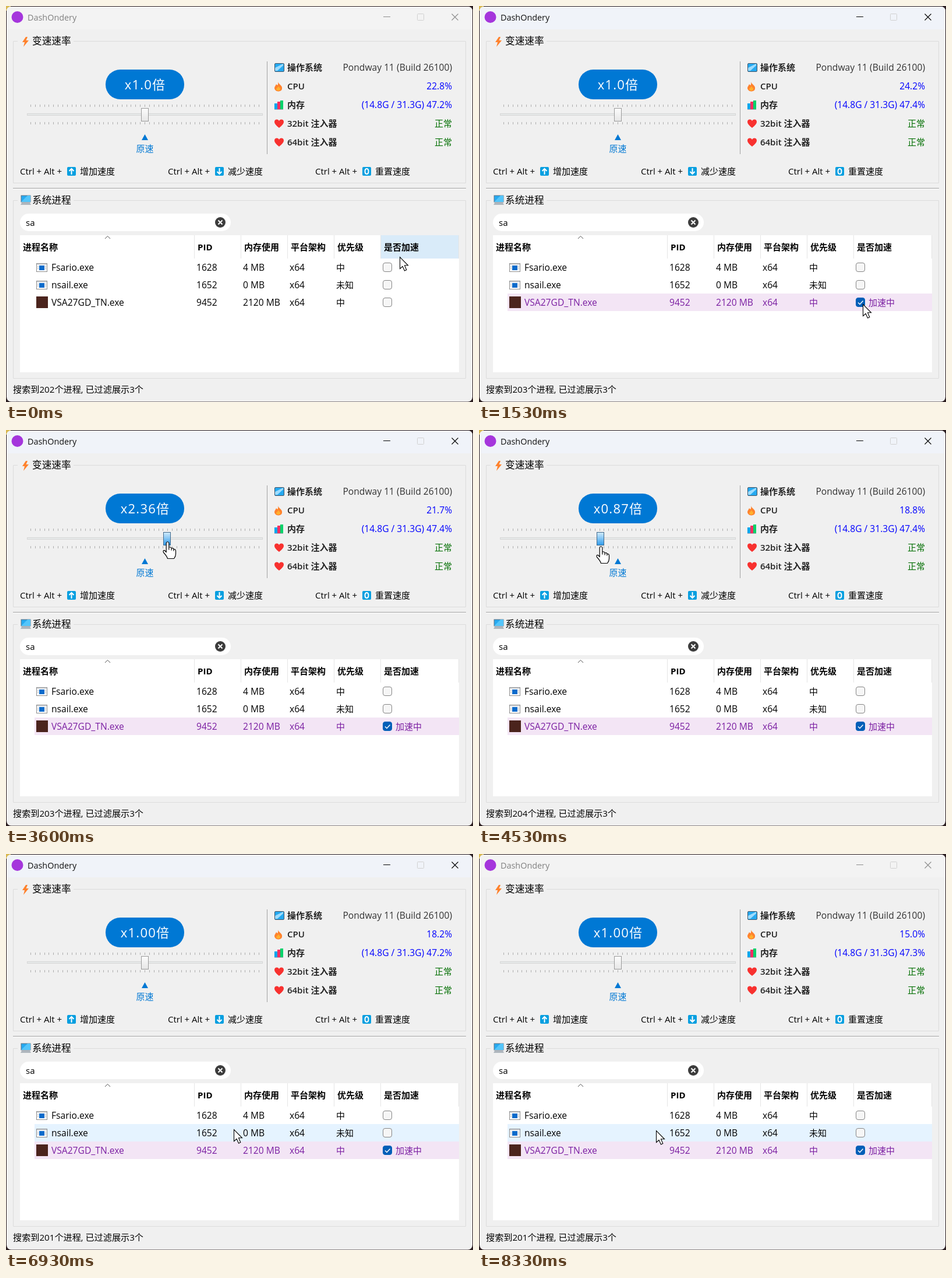
An HTML page that plays this animation: 802x679 px, repeating every 8.4 s.

```html
<!DOCTYPE html>
<html lang="zh-CN">
<head>
<meta charset="utf-8">
<style>
html, body { margin: 0; width: 100%; height: 100%; overflow: hidden; background: #2b1d20; }
svg { display: block; font: 15px "Open Sans", "Noto Sans", "Noto Sans CJK SC", "Noto Sans CJK", sans-serif; }
.latin { font-size: 15.6px; }
.title { font-size: 16.7px; }
.bold { font-weight: 600; }
.head { font-weight: 700; }
.end { text-anchor: end; }
.mid { text-anchor: middle; }
.line { fill: none; stroke: #dcdcdc; }
</style>
</head>
<body>
<svg id="stage" width="802" height="679" viewBox="0 0 802 679"></svg>
<script>
const LOOP = 8400, CHECKED_AT = 1400, BLURRED_AT = 7900;
const DRAG_FROM = 2650, DRAG_TO = 6000, CENTER = 238.5;
const COLUMNS = [24, 323, 403, 483, 563, 643, 778];
const ROWS = [
  ['Fsario.exe', '1628', '4 MB', 'x64', '中'],
  ['nsail.exe', '1652', '0 MB', 'x64', '未知'],
  ['VSA27GD_TN.exe', '9452', '2120 MB', 'x64', '中']
];

// [time, x, y] of the pointer tip
const POINTER = [
  [0, 676, 430], [250, 676, 430], [900, 659, 511], [1600, 659, 511],
  [2400, 239, 183], [2700, 239, 183], [3400, 285, 190], [4400, 209, 199],
  [4600, 209, 199], [5450, 246, 215], [5700, 246, 215], [5900, 239, 218],
  [6100, 240, 220], [6530, 320, 400], [6930, 391, 472], [7300, 391, 473],
  [7730, 304, 474], [8400, 304, 474]
];
const CPU = [[0, '22.8'], [900, '24.2'], [1900, '21.7'], [3900, '18.8'], [5400, '16.4'], [6600, '18.2'], [7600, '15.0']];
const MEMORY = [[0, '47.2'], [900, '47.4'], [5000, '47.2'], [7600, '47.3']];
const COUNT = [[0, 202], [900, 203], [3900, 204], [5400, 201]];

const text = (x, y, s, cls = '', attrs = '') => `<text x="${x}" y="${y}" class="${cls}" ${attrs}>${s}</text>`;
const rect = (x, y, w, h, fill, attrs = '') => `<rect x="${x}" y="${y}" width="${w}" height="${h}" fill="${fill}" ${attrs}/>`;
const path = (d, fill, attrs = '') => `<path d="${d}" fill="${fill}" ${attrs}/>`;
const at = (x, y, s) => `<g transform="translate(${x} ${y})">${s}</g>`;

const heart = path('M8 15C3 11 0 8 0 4.5C0 0 6-1 8 3C10-1 16 0 16 4.5C16 8 13 11 8 15Z', '#f8312f');
const bolt = path('M6 0L0 9H4L2 17L11 6H6.5L9 0Z', '#ff822d');
const flame = path('M6 0C8 5 14 6 13 12C12 18 1 18 0 11C0 8 2 7 3 4L5 6Q7 4 6 0Z', '#ff822d') +
  path('M7 7C7 10 11 10 10 13C9 16 3 16 3 12Q5 11 7 7Z', '#ffb02e');
const chart = rect(0, 5, 5, 11, '#00a6ed') + rect(5, 2, 5, 14, '#f92f60') + rect(10, 0, 5, 16, '#00d26a') +
  path('M0 15.5H15', 'none', 'stroke="#b4acbc"');
const desktop = rect(.5, .5, 16, 14, '#26a9f0', 'rx="1.5" stroke="#455565"') +
  path('M1 8L15 1V4L5 13H1Z', '#9ddcff');
const computer = rect(1, 0, 16, 11, '#26a9f0', 'stroke="#607080"') + path('M1 11L12 0H17V11Z', '#54c5fa') +
  path('M2 12H16L18 16H0Z', '#aeb6bd');
const program = rect(.5, .5, 18, 14, '#fff', 'stroke="#8c8c8c"') + rect(1, 1, 17, 2, '#d5d9de') +
  rect(5, 4, 9, 8, '#0b6bcb') + path('M2 6H4M2 9H4M15 6H17M15 9H17', 'none', 'stroke="#9aa4ae"');

const shortcut = (x, key, label) =>
  text(x, 289, 'Ctrl + Alt + ') +
  at(x + 81, 276, rect(0, 0, 15, 15, '#079fe0', 'rx="2"') + path(key, 'none', 'stroke="#fff" stroke-width="2"')) +
  text(x + 103, 289, label);

const info = (i, icon, label, value, color, id = '') =>
  at(461, 98 + 32 * i, icon) + text(483, 111 + 32 * i, label, 'bold', 'fill="#222"') +
  text(766, 111 + 32 * i, value, /^[\x20-\x7f]*$/.test(value) ? 'end latin' : 'end', `fill="${color}" id="${id}"`);

const group = (y, bottom) => path(`M20 ${y}.5H12.5V${bottom}.5H789.5V${y}.5H116`, 'none', 'class="line"');

const ticks = Array.from({ length: 51 }, (_, i) => {
  const x = Math.round(43 + i * 7.84) - .5;
  return `M${x} 169V173M${x} 199V203`;
}).join('');

const row = (cells, i) => {
  const y = 433 + 30 * i, x = [78, 327, 407, 487, 567];
  return `<g id="row${i}">` + rect(49, y, 729, 30, 'none', `id="back${i}"`) +
    (i < 2 ? at(52, y + 8, program) : rect(52, y + 5, 20, 20, '#4b241d')) +
    cells.map((c, k) => text(x[k], y + 21, c, k < 4 ? 'latin' : '')).join('') +
    rect(647.5, y + 7.5, 15, 15, '#f6f6f6', `rx="3.5" stroke="#858585" id="box${i}"`) + '</g>';
};

stage.innerHTML = `
<defs>
  <linearGradient id="blue" x2="0" y2="1"><stop stop-color="#d2ecfc"/><stop offset="1" stop-color="#2f9cec"/></linearGradient>
  <linearGradient id="grey" x2="0" y2="1"><stop stop-color="#fcfcfc"/><stop offset="1" stop-color="#e6e6e6"/></linearGradient>
</defs>` +
  rect(0, 0, 8, 8, '#d8b850') +
  rect(1, 1, 800, 677.5, '#f0f0f0', 'rx="8"') +
  path('M1 40V9Q1 1 9 1H793Q801 1 801 9V40Z', '#f3f3f3', 'id="bar"') +
  '<circle cx="19.5" cy="19" r="10" fill="#a536dc"/>' +
  `<g id="caption">${text(37, 25, 'DashOndery', '', 'style="font-size:14.4px"')}` +
  path('M648 18.5H660M765.5 13.5L776.5 24.5M776.5 13.5L765.5 24.5', 'none', 'stroke="currentColor" stroke-width="1.1"') + '</g>' +
  rect(706.5, 13.5, 11, 11, 'none', 'stroke="#d0d0d0" rx="1"') +

  group(60, 303) + at(28, 53, bolt) + text(45, 66, '变速速率', 'title') +
  rect(171, 109, 135, 51, '#0078d4', 'rx="25"') +
  text(239, 143, '', 'mid', 'id="speed" fill="#fff" style="font-size:22px;letter-spacing:1.2px"') +
  path(ticks, 'none', 'stroke="#adadad"') +
  rect(36.5, 184.5, 404, 3, '#e7eaea', 'stroke="#d6d6d6"') +
  rect(0, 175.5, 12, 22, 'url(#grey)', 'id="handle" stroke="#9a9a9a"') +
  path('M238.5 220L244 230H233Z', '#0078d4') + text(238.5, 250, '原速', 'mid', 'fill="#0078d4"') +
  path('M448.5 95V254', 'none', 'stroke="#a0a0a0"') +
  info(0, desktop, '操作系统', 'Pondway 11 (Build 26100)', '#333') +
  info(1, flame, 'CPU', ' ', '#00f', 'cpu') +
  info(2, chart, '内存', ' ', '#00f', 'memory') +
  info(3, heart, '32bit 注入器', '正常', '#006e00') +
  info(4, heart, '64bit 注入器', '正常', '#006e00') +
  shortcut(24, 'M7.5 13V3M3.5 7L7.5 3L11.5 7', '增加速度') +
  shortcut(278, 'M7.5 2V12M3.5 8L7.5 12L11.5 8', '减少速度') +
  shortcut(531, 'M7.5 3C3.5 3 3.5 12 7.5 12C11.5 12 11.5 3 7.5 3Z', '重置速度') +

  path('M12 312.5H790', 'none', 'stroke="#a0a0a0"') + path('M12 313.5H790', 'none', 'stroke="#fff"') +
  group(333, 638) + at(25, 325, computer) + text(45, 339, '系统进程', 'title') +
  rect(24, 356, 362, 30, '#fff', 'rx="15"') + text(34, 377, 'sa') +
  '<circle cx="368" cy="371" r="9" fill="#3c3c3c"/>' +
  path('M364.5 367.5L371.5 374.5M371.5 367.5L364.5 374.5', 'none', 'stroke="#fff" stroke-width="2"') +
  rect(24, 393, 754, 235, '#fff') + rect(0, 393, 0, 40, '#d9ebf9', 'id="headHover"') +
  path(COLUMNS.slice(1).map(x => `M${x - (x > 700 ? .5 : -.5)} 393V433`).join(''), 'none', 'stroke="#e5e5e5"') +
  path('M170 399L174.5 394.5L179 399', 'none', 'stroke="#555"') +
  ['进程名称', 'PID', '内存使用', '平台架构', '优先级', '是否加速']
    .map((s, i) => text(COLUMNS[i] + (i ? 6 : 5), 419, s, 'head')).join('') +
  ROWS.map(row).join('') +
  `<g id="checked">${path('M651 508.5L654 511.5L659.5 505.5', 'none', 'stroke="#fff" stroke-width="1.4"')}` +
  text(669, 514, '加速中', '', 'fill="#7b1fa2"') + '</g>' +
  text(12, 663, '', '', 'id="status" style="font-size:15.15px"') +
  path('M0 0V20L4.6 16L8 23.5L11.3 22L8 14.3H14Z', '#fff', 'id="arrow" stroke="#000" stroke-width="1.1"') +
  path('M-2.3 2Q0-1.5 2.3 2V9.5Q6 8.5 6.6 11.5Q9.6 10 10.4 13Q14 12.5 14 16V21Q14 25 11 29H0Q-1 25-7 18.5Q-8.5 14.5-5 15L-2.3 18Z' +
    'M2.3 9.5V14M6.6 11.5V15M10.4 13V16', '#fff', 'id="hand" stroke="#000" stroke-width="1.2" stroke-linejoin="round"');

const $ = id => document.getElementById(id);
const set = (id, attrs) => { for (const k in attrs) $(id).setAttribute(k, attrs[k]); };
const show = (id, on) => set(id, { visibility: on ? 'visible' : 'hidden' });
const step = (list, t) => list.findLast(s => s[0] <= t)[1];

function pointerAt(t) {
  const i = POINTER.findIndex(p => p[0] > t), a = POINTER[i - 1], b = POINTER[i];
  let k = (t - a[0]) / (b[0] - a[0]);
  k = k * k * (3 - 2 * k);
  return [a[1] + (b[1] - a[1]) * k, a[2] + (b[2] - a[2]) * k];
}

function draw(t) {
  const [x, y] = pointerAt(t);
  const active = t >= CHECKED_AT && t < BLURRED_AT, checked = t >= CHECKED_AT;
  const dragging = t >= DRAG_FROM && t < DRAG_TO;
  const onSlider = x > 36 && x < 441 && y > 168 && y < 205;

  set('bar', { fill: active ? '#f0f3f9' : '#f3f3f3' });
  set('caption', { fill: active ? '#111' : '#808080', color: active ? '#000' : '#8c8c8c' });

  const offset = dragging ? Math.round(x - 239) : 0;
  const factor = 1 + offset * (offset < 0 ? .0044 : .0357);
  const hot = onSlider && Math.abs(x - CENTER) < 7;
  $('speed').textContent = `x${factor.toFixed(t < DRAG_FROM ? 1 : 2)}倍`;
  set('handle', {
    x: CENTER + offset - 6,
    fill: dragging || hot ? 'url(#blue)' : 'url(#grey)',
    stroke: dragging ? '#41698c' : hot ? '#0078d7' : '#9a9a9a'
  });

  $('cpu').textContent = step(CPU, t) + '%';
  $('memory').textContent = `(14.8G / 31.3G) ${step(MEMORY, t)}%`;
  $('status').textContent = `搜索到${step(COUNT, t)}个进程, 已过滤展示3个`;

  const inTable = x >= 24 && x < 778;
  const column = inTable && y >= 393 && y < 433 ? COLUMNS.findLastIndex(c => c <= x) : -1;
  set('headHover', column < 0 ? { width: 0 } : { x: COLUMNS[column], width: COLUMNS[column + 1] - COLUMNS[column] });
  const hovered = inTable && y >= 433 ? Math.floor((y - 433) / 30) : -1;
  ROWS.forEach((_, i) => {
    const on = checked && i === 2;
    set('back' + i, { fill: on ? '#f3e5f5' : hovered === i ? '#e5f3ff' : 'none' });
    set('row' + i, { fill: on ? '#7b1fa2' : '#000' });
  });
  set('box2', { fill: checked ? '#005fb8' : '#f6f6f6', stroke: checked ? '#005fb8' : '#858585' });
  show('checked', checked);

  const hand = dragging || onSlider;
  show('hand', hand);
  show('arrow', !hand);
  set(hand ? 'hand' : 'arrow', { transform: `translate(${Math.round(x) + .5} ${Math.round(y) + .5})` });
}

const start = performance.now();
(function frame() {
  draw((performance.now() - start) % LOOP);
  requestAnimationFrame(frame);
})();
</script>
</body>
</html>
```
